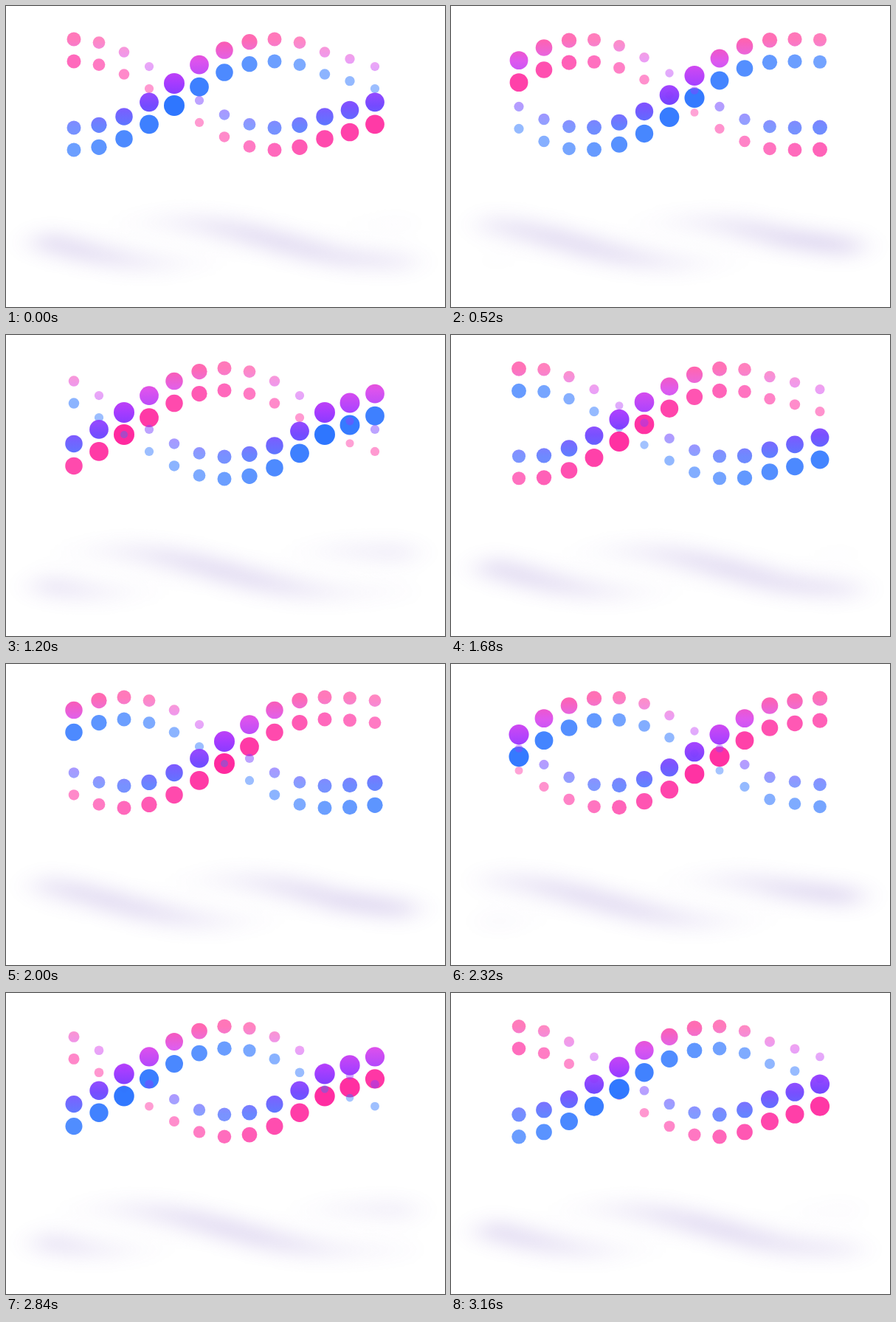
These frames come from a looping animation (595 by 408 pixels, 3200 ms). An HTML page with a canvas:

```html
<!DOCTYPE html>
<html lang="en">
<head>
<meta charset="utf-8">
<title>Dotted helix</title>
<style>
  html, body { margin: 0; width: 100%; height: 100%; overflow: hidden; background: #fff; }
  canvas { position: absolute; left: 0; top: 0; }
  #floor { opacity: .16; }
</style>
</head>
<body>
<canvas id="floor" width="595" height="408"></canvas>
<canvas id="helix" width="595" height="408"></canvas>
<script>
const LOOP = 3200, STEP = 40, COLUMNS = 13, TAU = 2 * Math.PI;
const floor = document.getElementById('floor').getContext('2d');
const helix = document.getElementById('helix').getContext('2d');

const rainbow = helix.createLinearGradient(0, 45, 0, 165);
['#ff3f9c', '#d945ec', '#a53bff', '#6a3cff', '#3c62ff']
  .forEach((color, i) => rainbow.addColorStop(i / 4, color));

const soft = floor.createRadialGradient(0, 0, 0, 0, 0, 3);
for (let i = 0; i <= 12; i++) {
  const alpha = i < 12 ? Math.exp(-((i / 4) ** 2) / 2) : 0;
  soft.addColorStop(i / 12, `rgba(106,72,187,${alpha})`);
}

// The last two columns follow at half the usual delay.
const delay = i => 100 * i + 100 * Math.min(i, 10);

function pose(strand, i, time) {
  const turn = (time - delay(i)) / LOOP + strand / 2 + 1;
  const phase = turn % 1;
  const angle = phase * TAU;
  // Columns still finishing the previous turn swing a little wider in front.
  const wide = time < delay(i) && phase < .5;
  const swing = angle - (wide ? .06 * Math.sin(2 * angle) : 0);
  // Depth is a triangle wave: 1 in front, -1 at the back.
  const depth = phase < .5 ? 1 - Math.abs(4 * phase - 1) : Math.abs(4 * phase - 3) - 1;
  return { x: 92 + 34 * i, y: -60 * Math.cos(swing), angle, depth };
}

function drawDots(poses, centre, fill) {
  helix.fillStyle = fill;
  for (const p of poses) {
    helix.globalAlpha = .7 + .3 * p.depth;
    helix.beginPath();
    helix.arc(p.x, centre + p.y, 9.5 + 4.5 * p.depth, 0, TAU);
    helix.fill();
  }
}

function drawShadow(p) {
  floor.save();
  floor.globalAlpha = .65 * ((1 - Math.cos(p.angle)) / 2) ** 2;
  floor.translate(297 + (p.x - 296) * 1.15, 321 + 28 * Math.sin(p.angle));
  floor.scale(24, 14);
  floor.fillStyle = soft;
  floor.fillRect(-3, -3, 6, 6);
  floor.restore();
}

function draw(now) {
  const time = Math.floor(now % LOOP / STEP) * STEP;
  const strands = [0, 1].map(s =>
    Array.from({ length: COLUMNS }, (_, i) => pose(s, i, time)));

  floor.clearRect(0, 0, 595, 408);
  floor.globalCompositeOperation = 'lighter';
  strands.flat().forEach(drawShadow);

  helix.clearRect(0, 0, 595, 408);
  drawDots(strands[0], 135, '#ff2a9f');
  drawDots(strands[1], 135, '#2e76ff');
  strands.forEach(s => drawDots(s, 105, rainbow));
}

const start = performance.now();
function tick() {
  draw(performance.now() - start);
  requestAnimationFrame(tick);
}
tick();
</script>
</body>
</html>
```
